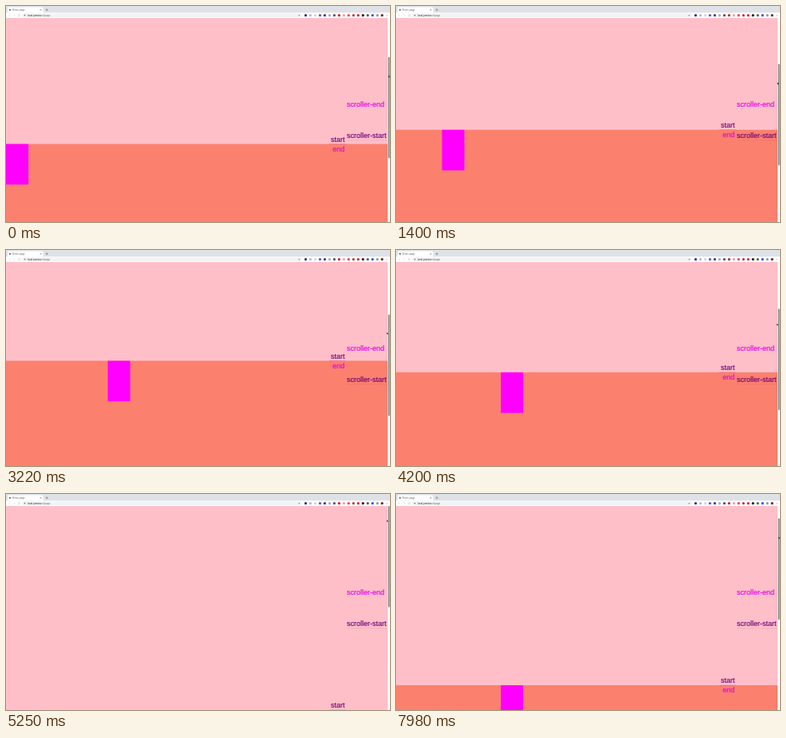
Animation, 480 px wide and 270 px high, one loop 8000 ms. Source, as an HTML page:

```html
<!DOCTYPE html>
<html lang="en">
<head>
<meta charset="utf-8">
<title>Scroll markers</title>
<style>
  html, body { margin: 0; width: 100%; height: 100%; overflow: hidden; background: #fff; }
  svg { display: block; width: 480px; height: 270px; }
  text { font-family: "Liberation Sans", Arial, sans-serif; font-size: 9px; }
  .tiny { font-size: 3px; fill: #666; }
  .start { fill: #700078; stroke: #700078; stroke-width: .15; }
  .end { fill: #e400e6; stroke: #e400e6; stroke-width: .15; }
  .line { fill: #800080; }
  .right { text-anchor: end; }
</style>
</head>
<body>
<svg viewBox="0 0 480 270">
  <rect width="480" height="270" fill="#fafafa"/>
  <rect y="15" width="477" height="255" fill="#ffbfc9"/>

  <g id="panel">
    <rect width="477" height="270" fill="#fb806e"/>
    <rect id="box" width="28" height="50.7" fill="#f0f"/>
    <rect class="line" x="404" y="-.3" width="21" height=".6" opacity=".3"/>
    <text class="start right" x="423.4" y="-2.6">start</text>
    <text class="end right" x="423.4" y="9.2">end</text>
  </g>

  <text class="end" x="426" y="126">scroller-end</text>
  <text class="start" x="426" y="165.2">scroller-start</text>
  <rect class="line" x="426" y="167.6" width="50.5" height=".6" opacity=".15"/>

  <rect id="thumb" x="477.9" width="1.5" height="126.6" rx=".7" fill="#707070"/>

  <g id="chrome">
    <rect width="480" height="8.5" fill="#dee1e6"/>
    <rect y="8.5" width="480" height="6.5" fill="#fff"/>
    <path d="M1 8.5Q2 8.5 2 7V3Q2 1.5 3.5 1.5H45Q46.5 1.5 46.5 3V7Q46.5 8.5 47.5 8.5Z" fill="#fff"/>
    <circle cx="5" cy="4.8" r="1.1" fill="#666"/>
    <text class="tiny" x="8" y="5.7">Demo page</text>
    <path d="M42.6 4l1.6 1.6m0-1.6l-1.6 1.6M49.5 4.8h3m-1.5-1.5v3" stroke="#555" stroke-width=".5"/>
    <path d="M5 10.6l-1.2 1 1.2 1M9.8 10.6l1.2 1-1.2 1" fill="none" stroke="#bbb" stroke-width=".4"/>
    <circle cx="16.5" cy="11.6" r="1.2" fill="none" stroke="#aaa" stroke-width=".4"/>
    <rect x="20" y="9.2" width="350" height="4.8" rx="2.4" fill="#f1f3f4"/>
    <circle cx="23.5" cy="11.6" r=".9" fill="#777"/>
    <text class="tiny" x="27" y="12.5"><tspan fill="#222">local preview</tspan> of page</text>
  </g>

  <path id="cursor" d="M0 0V2.4L.6 1.9 1 2.7 1.4 2.5 1.1 1.7 1.8 1.6Z"/>
</svg>
<script>
  const LOOP = 8000, TICK = 70, TOP = 15, BOTTOM = 270;
  const $ = id => document.getElementById(id);

  const smooth = p => p * p * (3 - 2 * p);
  const easeOut = power => p => 1 - (1 - p) ** power;

  // Runs through moves of the form [from ms, to ms, value, easing].
  function track(t, value, ...moves) {
    for (const [from, to, goal, ease = smooth] of moves) {
      const p = Math.min(1, Math.max(0, (t - from) / (to - from)));
      value += (goal - value) * ease(p);
    }
    return value;
  }

  const panelY = t => track(t, 172.5,
    [210, 2800, 138.5, easeOut(1.2)],
    [3950, 5165, BOTTOM],
    [6820, 7300, 244],
    [7630, 7990, 239]);

  const boxX = t => track(t, 0, [612, 3752, 131, easeOut(2)]);

  const cursorX = t => track(t, 478, [0, 2380, 476], [5950, 6650, 475.3], [6790, 6930, 478.3]);

  // Distance from the top of the thumb to the pointer.
  const grip = t => track(t, 23, [2940, 3990, 18.4], [4970, 6650, 4.8], [6720, 6930, 23]);

  function addIcons() {
    const colors = "#2c2c90 #b8b4e0 #d4d4dc #6a50d0 #34456e #b3a3cf #555 #d92020 #f0a0a8 "
      + "#e04860 #c03838 #e02038 #222 #56665c #3050f0 #999 #6c2420";
    const dot = (x, r, fill) => {
      const c = document.createElementNS("http://www.w3.org/2000/svg", "circle");
      for (const [k, v] of Object.entries({ cx: x, cy: 11.7, r, fill })) c.setAttribute(k, v);
      $("chrome").append(c);
    };
    dot(366.5, .8, "#5578c0");
    colors.split(" ").forEach((fill, i) => dot(374.6 + i * 5.97, 1.6, fill));
    dot(476, .5, "#666");
  }

  function move(id, x, y) {
    $(id).setAttribute("transform", `translate(${x.toFixed(2)} ${y.toFixed(2)})`);
  }

  function draw(now) {
    const t = Math.floor(now % LOOP / TICK) * TICK;
    const edge = panelY(t);
    const thumbY = TOP + (BOTTOM - edge) / 2;
    move("panel", 0, edge);
    move("box", boxX(t), 0);
    move("thumb", 0, thumbY);
    move("cursor", cursorX(t), thumbY + grip(t));
  }

  function frame() {
    draw(performance.now());
    requestAnimationFrame(frame);
  }

  addIcons();
  frame();
</script>
</body>
</html>
```
